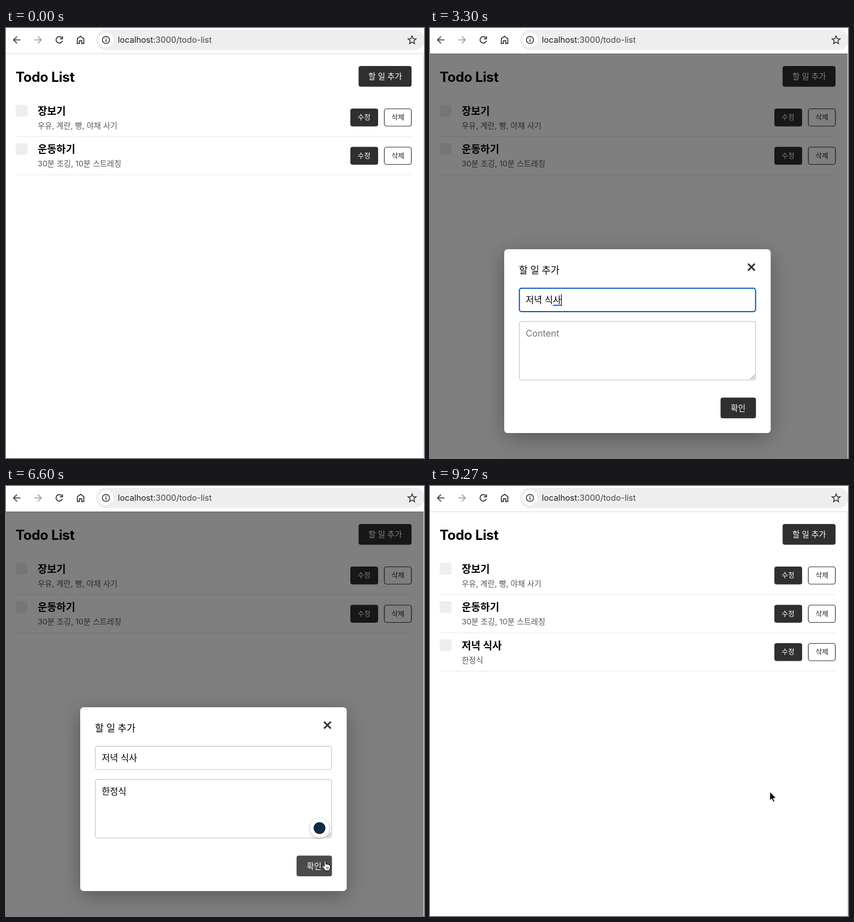
These frames come from a looping animation (738 px wide and 758 px high, 9.43 s). An HTML page:

```html
<!DOCTYPE html>
<html lang="ko">
<head>
<meta charset="utf-8">
<title>Todo List</title>
<style>
html, body { margin: 0; width: 100%; height: 100%; overflow: hidden; background: #fff; }
svg { display: block; width: 738px; height: 758px; font-family: Inter, "Noto Sans CJK KR", sans-serif; }
text { white-space: pre; }
.line { fill: none; stroke: #333; stroke-width: 1.7; }
.mid { text-anchor: middle; }
.dark { fill: #2f2f2f; }
.dark.hover { fill: #4a4a4a; }
.field { fill: #fff; stroke: #c4c4c4; stroke-width: 1.2; }
.field.focus { stroke: #0b5bc0; stroke-width: 2; }
.hint { fill: #757575; }
#panel { filter: drop-shadow(0 8px 18px rgba(0,0,0,.3)); }
#badge circle:first-child { filter: drop-shadow(0 1px 2px rgba(0,0,0,.3)); }
</style>
</head>
<body>
<svg viewBox="0 0 738 758">
  <!-- browser toolbar -->
  <path d="M0 45.5H738M737.5 45V758" stroke="#dcdcdc"/>
  <g class="line">
    <path d="M25.500 21H13.500M19.300 15L13.300 21L19.300 27"/>
    <path d="M50 21H62M56.200 15L62.200 21L56.200 27" stroke="#999"/>
    <path d="M98.500 17.300A5.700 5.700 0 1 0 99.500 22.500M99.700 14.700V19.200H95.200"/>
    <path d="M126 27.300V18.800L131.700 14.500L137.400 18.800V27.300H133.700V22.300H129.700V27.300Z"/>
  </g>
  <rect x="159" y="3" width="580" height="36" rx="18" fill="#eee"/>
  <circle cx="176.500" cy="21" r="13" fill="#fff"/>
  <circle cx="176.500" cy="21" r="6.300" class="line" style="stroke-width:1.500"/>
  <path d="M176.500 20V24.500M176.500 17.200V18.700" class="line"/>
  <text x="197.500" y="26" font-size="14.600" fill="#1f1f1f">localhost<tspan fill="#444">:3000/todo-list</tspan></text>
  <path id="star" class="line" style="stroke-width:1.500"/>

  <!-- page -->
  <text x="17" y="94.500" font-size="24" font-weight="700" letter-spacing="-.3">Todo List</text>
  <rect id="add" class="dark" x="622.500" y="67" width="93.500" height="36.500" rx="4"/>
  <text class="mid" x="669.500" y="90.400" font-size="14.150" fill="#fff" font-weight="500">할 일 추가</text>
  <g id="rows"></g>

  <!-- dialog -->
  <g id="modal">
    <rect y="45" width="737" height="713" fill="rgba(0,0,0,.5)"/>
    <rect id="panel" x="131" y="390" width="470.500" height="324" rx="6" fill="#fff"/>
    <text x="157" y="433" font-size="17" font-weight="500">할 일 추가</text>
    <path d="M561.500 415.500L573.500 427.500M573.500 415.500L561.500 427.500" class="line" style="stroke-width:3"/>
    <g id="title"><rect class="field" x="157.800" y="458.800" width="417" height="41.200" rx="4"/></g>
    <g id="content"><rect class="field" x="157.800" y="517.300" width="417" height="103.200" rx="4"/></g>
    <path d="M566 619L573.500 611.500M570 619L573.500 615.500" stroke="#666"/>
    <rect id="ok" class="dark" x="513" y="651.500" width="62.500" height="36.500" rx="4"/>
    <text class="mid" x="544" y="675" font-size="14.100" fill="#fff" font-weight="500">확인</text>
  </g>

  <g id="badge">
    <circle cx="553.500" cy="603" r="17" fill="#fff"/>
    <circle cx="553.500" cy="603" r="10.500" fill="#0f2b46"/>
  </g>
  <g id="cursor" stroke-linejoin="round">
    <path id="arrow" d="M0 0V15.500L3.500 12.300L6 18L8.500 17L6.100 11.300H11Z" stroke="#fff"/>
    <path id="hand" fill="#fff" stroke="#000" d="M0 10V2Q0 .5 1.300 .5T2.700 2V7Q4.500 5.500 5.300 7.300Q7 6.300 7.800 8Q10.500 7.300 10.500 10Q10.500 14 8.700 18H1.500Q0 14.500-3.500 11.500Q-4.800 9.500-3 9Q-1.500 9 0 11.500M4 11.500V15M6.500 11.500V15"/>
  </g>
</svg>
<script>
const LOOP = 9430;
const $ = id => document.getElementById(id);
const show = (el, on) => el.style.display = on ? '' : 'none';
const within = (t, from, to) => t >= from && t < to;
const clamp = v => Math.max(0, Math.min(1, v));

function add(parent, tag, attrs, text = '') {
  const el = document.createElementNS('http://www.w3.org/2000/svg', tag);
  for (const key in attrs) el.setAttribute(key, attrs[key]);
  el.textContent = text;
  return parent.appendChild(el);
}

$('star').setAttribute('d', 'M' + Array.from({ length: 10 }, (_, i) => {
  const angle = (i / 5 - .5) * Math.PI, r = i % 2 ? 3.4 : 7.5;
  return [717 + r * Math.cos(angle), 21.5 + r * Math.sin(angle)];
}).join('L') + 'Z');

const rows = [
  ['장보기', '우유, 계란, 빵, 야채 사기'],
  ['운동하기', '30분 조깅, 10분 스트레칭'],
  ['저녁 식사', '한정식'],
].map(([title, note], i) => {
  const row = add($('rows'), 'g', { transform: `translate(0 ${i * 67.5})` });
  add(row, 'rect', { x: 17, y: 135.3, width: 21, height: 21, rx: 4, fill: '#eee' });
  add(row, 'text', { x: 56, y: 152.7, 'font-size': 18, 'font-weight': 700 }, title);
  add(row, 'text', { x: 56, y: 176.7, 'font-size': 13.7, fill: '#555' }, note);
  add(row, 'rect', { x: 608, y: 142, width: 49, height: 31.5, rx: 4, class: 'dark' });
  add(row, 'rect', { x: 668, y: 142.5, width: 47.7, height: 30.5, rx: 4, fill: '#fff', stroke: '#333', 'stroke-width': 1.2 });
  const label = { y: 162.1, 'font-size': 12.2, class: 'mid', 'font-weight': 500 };
  add(row, 'text', { ...label, x: 632.3, fill: '#fff' }, '수정');
  add(row, 'text', { ...label, x: 692, fill: '#222' }, '삭제');
  add(row, 'path', { d: 'M17 191.300H716', stroke: '#e8e8e8' });
  return row;
});

// Each stroke is [time, text]; the last character is underlined while it is composed.
function makeField(id, hint, baseline, strokes, focusFrom, focusTo, blinks) {
  const box = $(id);
  const frame = box.querySelector('rect');
  const label = add(box, 'text', { x: 169, y: baseline, 'font-size': 15.8 });
  const underline = add(box, 'rect', { y: baseline + 2.5, height: 2, fill: '#0b6cdb' });
  const caret = add(box, 'rect', { y: baseline - 16, width: 1.2, height: 20.5 });
  return t => {
    const value = strokes.reduce((text, [at, next]) => t >= at ? next : text, '');
    const focused = within(t, focusFrom, focusTo);
    label.textContent = value || hint;
    label.setAttribute('class', value ? '' : 'hint');
    frame.classList.toggle('focus', focused);
    const end = value ? label.getComputedTextLength() : 0;
    caret.setAttribute('x', 168.8 + end);
    show(caret, focused && !blinks.some(([from, to]) => within(t, from, to)));
    const composing = focused && value && !value.endsWith('\u00a0');
    show(underline, composing);
    if (composing) {
      const width = label.getSubStringLength(value.length - 1, 1);
      underline.setAttribute('x', 169 + end - width);
      underline.setAttribute('width', width);
    }
  };
}

const fields = [
  makeField('title', 'Title', 485.3, [
    [2100, 'ㅈ'], [2200, '저'], [2400, '전'], [2500, '저녀'], [2600, '저녁'], [2700, '저녁\u00a0'],
    [2900, '저녁\u00a0ㅅ'], [3000, '저녁\u00a0시'], [3100, '저녁\u00a0식'], [3200, '저녁\u00a0싟'], [3300, '저녁\u00a0식사'],
  ], 1000, 3600, [[1600, 1900]]),
  makeField('content', 'Content', 543.5, [
    [4800, 'ㅎ'], [4900, '한'], [5000, '핝'], [5100, '한정'], [5200, '한정시'], [5300, '한정식'],
  ], 3600, 6400, [[4300, 4600], [5900, 6400]]),
];

// Pointer stops: [time, x, y]
const stops = [
  [100, 600, 40], [800, 682, 77], [5400, 682, 77], [5500, 701, 97], [6400, 562, 660],
  [7500, 562, 660], [8300, 600, 537], [8600, 600, 538], [9000, 600, 539], [LOOP, 600, 539],
];

function pointerAt(t) {
  const i = Math.max(1, stops.findIndex(([at]) => at > t));
  const [t0, x0, y0] = stops[i - 1], [t1, x1, y1] = stops[i];
  const p = clamp((t - t0) / (t1 - t0)), k = p * p * (3 - 2 * p);
  return [x0 + (x1 - x0) * k, y0 + (y1 - y0) * k];
}

const inside = (el, x, y) => {
  const dx = x - el.x.baseVal.value, dy = y - el.y.baseVal.value;
  return dx >= 0 && dy >= 0 && dx <= el.width.baseVal.value && dy <= el.height.baseVal.value;
};

function draw(now) {
  const time = now % LOOP;
  const t = time >= 9270 ? 9270 : Math.floor(time / 100) * 100; // the screen refreshes every 100 ms
  const open = within(t, 1000, 6700);
  show($('modal'), open);
  show(rows[2], t >= 6800);
  if (open) fields.forEach(update => update(t));

  $('badge').style.opacity = t < 6600 ? clamp((t - 3600) / 300) : clamp(1 - (t - 6600) / 220);

  const [x, y] = pointerAt(t);
  const overAdd = within(t, 100, 1000) && inside($('add'), x, y);
  const overOk = within(t, 5500, 6700) && inside($('ok'), x, y);
  $('add').classList.toggle('hover', overAdd);
  $('ok').classList.toggle('hover', overOk);
  show($('cursor'), within(t, 100, 2100) || t >= 5500);
  $('cursor').setAttribute('transform', `translate(${x} ${y})`);
  show($('hand'), overAdd || overOk);
  show($('arrow'), !overAdd && !overOk);
  requestAnimationFrame(() => draw(performance.now() - start));
}

const start = performance.now();
draw(0);
</script>
</body>
</html>
```
